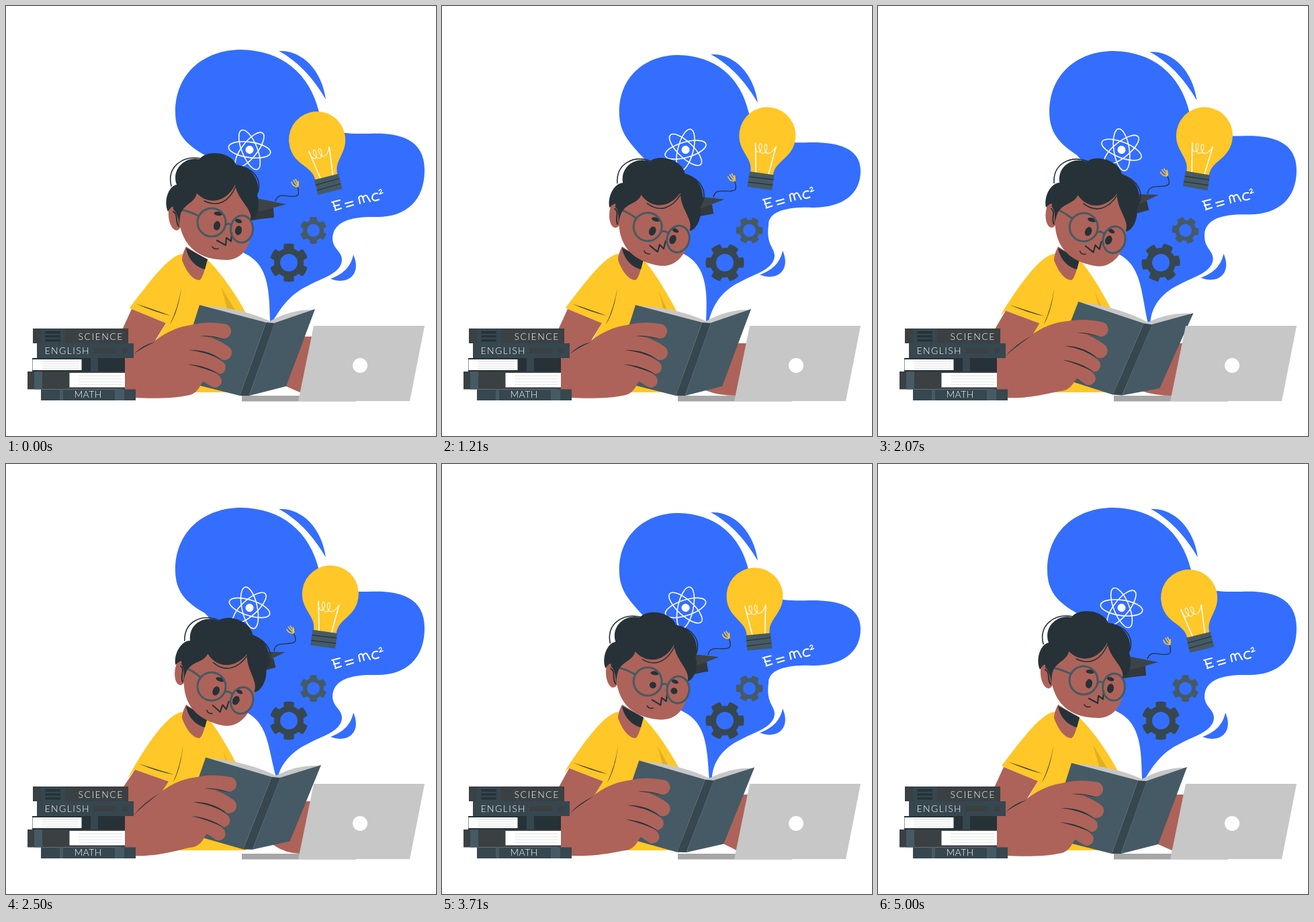
Recreate the animation shown at these times as an HTML page with a canvas. Size 640 by 640 pixels, loop 5.07 s.

```html
<!DOCTYPE html>
<html lang="en">
<head>
<meta charset="utf-8">
<title>Reading</title>
<style>
html, body { margin: 0; width: 100%; height: 100%; overflow: hidden; background: #fff; }
canvas { display: block; width: 100vw; height: 100vh; }
</style>
</head>
<body>
<canvas id="stage" width="640" height="640"></canvas>
<script>
const ctx = document.getElementById('stage').getContext('2d');
const BLUE = '#346eff', YELLOW = '#ffc727', SKIN = '#ad6359', DARK = '#263238',
  SLATE = '#455a64', DEEP = '#37474f', COAL = '#3b4043', GREY = '#c7c7c7', WHITE = '#fff';
const LOOP = 5070, CYCLE = 5000, STEPS = 70;
const rad = d => d * Math.PI / 180;
const clamp = v => Math.max(0, Math.min(1, v));

// Eased rise from 0 to 1 between two times, and a rise followed by a fall.
function ramp(t, from, to) {
  const u = clamp((t - from) / (to - from));
  return u * u * (3 - 2 * u);
}
const pulse = (t, from, peak, to) => ramp(t, from, peak) - ramp(t, peak, to);
// Goes 0, 1, 0 once per period.
const swing = (t, period) => (1 - Math.cos(2 * Math.PI * t / period)) / 2;

function svg(color, d, rule = 'nonzero') {
  ctx.fillStyle = color;
  ctx.fill(new Path2D(d), rule);
}
function line(color, width, d) {
  ctx.strokeStyle = color; ctx.lineWidth = width;
  ctx.stroke(new Path2D(d));
}
function rect(color, x, y, w, h) {
  ctx.fillStyle = color;
  ctx.fillRect(x, y, w, h);
}
function oval(x, y, rx, ry, tilt) {
  ctx.beginPath();
  ctx.ellipse(x, y, rx, ry, rad(tilt), 0, 7);
}
function disc(color, x, y, rx, ry = rx, tilt = 0) {
  oval(x, y, rx, ry, tilt);
  ctx.fillStyle = color; ctx.fill();
}
function ring(color, width, x, y, rx, ry = rx, tilt = 0) {
  oval(x, y, rx, ry, tilt);
  ctx.strokeStyle = color; ctx.lineWidth = width; ctx.stroke();
}
// A line that tapers at both ends.
const crease = (a, [x, y], b, w) =>
  svg(DARK, `M${a}Q${x} ${y - w} ${b}Q${x} ${y + w} ${a}`);
function at(x, y, angle, draw) {
  ctx.save();
  ctx.translate(x, y); ctx.rotate(rad(angle));
  draw();
  ctx.restore();
}
const about = (px, py, dx, dy, angle, draw) =>
  at(px + dx, py + dy, angle, () => { ctx.translate(-px, -py); draw(); });

function poseAt(t) {
  const push = pulse(t, 50, 640, 1200), lift = pulse(t, 2150, 3000, 3900);
  const twist = pulse(t, 1300, 2070, 2900) + .4 * pulse(t, 3000, 3710, 4500);
  const lean = .69 * ramp(t, 0, 1200) + .31 * ramp(t, 1800, 2900) - ramp(t, 3000, 4000);
  const dx = 12 * (push + lift) + 2 * twist, dy = -4 * push - 16 * lift, tilt = 3.7 * twist;
  const c = Math.cos(rad(tilt)), s = Math.sin(rad(tilt));
  return {
    lean,
    raise: clamp(push + lift + .3 * twist),
    armDown: ramp(t, 200, 600) - ramp(t, 3100, 3700),
    sway: swing(t, 2500),
    withBook: draw => about(370, 570, dx, dy, tilt, draw),
    // Where a point that moves with the book ends up.
    held: (x, y) => [370 + dx + (x - 370) * c - (y - 570) * s, 570 + dy + (x - 370) * s + (y - 570) * c]
  };
}

const CLOUD = 'C392 430 391 400 372 380C355 362 340 372 330 330C325 290 320 245 296 222' +
  'C268 206 252 190 252 158C252 100 295 65 350 65C410 66 452 100 466 158' +
  'C478 192 505 190 540 190C580 188 623 195 623 244C623 290 595 315 550 314' +
  'C520 313 486 318 486 347C487 362 500 365 500 378C499 398 470 405 450 416C420 430 408 452 ';

function cloud({ sway, held }) {
  // Each lobe shrinks toward its own middle.
  const squeeze = (x, y) => {
    if (y > 360) return x > 400 ? [x - 5 * sway, y - 6 * sway] : [x + 3 * sway, y];
    if (x >= 478) return [x, y + (250 - y) * .22 * sway];
    return y < 215 ? [x + (370 - x) * .1 * sway, y + (160 - y) * .085 * sway] : [x, y];
  };
  const [x, y] = held(393, 469);
  const outline = CLOUD.replace(/(\d+) (\d+)/g, (_, px, py) => squeeze(+px, +py).join(' '));
  svg(BLUE, `M${x} ${y}${outline}${x + 4} ${y}Z`);
  at(-6 * sway, 5 * sway, 0, () => svg(BLUE, 'M406 67C440 65 470 95 476 139C460 112 438 84 406 67Z'));
  at(-10 * sway, -6 * sway, 0, () => svg(BLUE, 'M517 370C530 400 508 416 483 406C505 398 514 385 517 370Z'));
}

function gear(color, x, y, r, hole, angle) {
  at(x, y, angle, () => {
    ctx.beginPath();
    for (let i = 0; i < 6; i++) {
      const a = rad(i * 60 - 90);
      ctx.arc(0, 0, r, a - .27, a + .27);
      ctx.arc(0, 0, r * .77, a + .35, a + rad(60) - .35);
    }
    ctx.closePath();
    ctx.moveTo(hole, 0);
    ctx.arc(0, 0, hole, 0, 7);
    ctx.fillStyle = color;
    ctx.fill('evenodd');
  });
}

function atom(t) {
  at(362.5, 214, 8 - 50 * swing(t, CYCLE), () => {
    for (let i = 0; i < 3; i++) ring(WHITE, 1.6, 0, 0, 31.5, 11.5, 60 * i);
    disc(WHITE, 0, 0, 6);
  });
}

function formula(sway) {
  at(-7.5 * sway, -3.5 * sway, 0, () => {
    line(WHITE, 2.1, 'M487 292L491 304M485 292L497 289M488 298L496 296M490 304L499 301' +
      'M505 294L516 291M507 299L517 296' +
      'M527 294L525 285Q529 280 531 285L533 292M531 285Q536 279 538 284L542 291' +
      'M553 279Q545 278 545 286Q547 292 555 288');
    line(WHITE, 1.4, 'M555 275Q558 271 559 275L556 280L561 278');
  });
}

function cap(t) {
  const up = swing(t, CYCLE);
  about(400, 295, 4 * Math.sin(2 * Math.PI * t / CYCLE) - up, -12 * up, -10 * up, () => {
    svg('#31393d', 'M350 300L398 301L399 315Q382 316 355 321Z');
    svg('#3d4448', 'M340 283L372 286L417 295L386 304L345 310Z');
    line(DARK, 1.3, 'M401 290C406 274 424 288 434 282C437 278 435 273 434 269');
    line(YELLOW, 1.6, 'M434 269Q427 269 425 262M434 268Q430 264 428 259M435 268Q434 263 431 258M435 267L435 261');
  });
}

function rays(t) {
  const beat = t % 2500;
  const outer = 48 + 9 * clamp((beat - 330) / 150), inner = 48 + 9 * clamp((beat - 500) / 170);
  if (outer - inner < .2) return;
  for (let i = -4; i <= 4; i++) at(0, 0, 30 * i, () => line(DARK, 1.5, `M0 ${-inner}V${-outer}`));
}

function bulb(t) {
  const x = 463 + 23 * (ramp(t, 0, 1450) - ramp(t, 2000, 4150));
  const y = 199 - 6.5 * (ramp(t, 0, 1200) - ramp(t, 2000, 5000));
  const tilt = -14 + 24 * (ramp(t, 0, 1450) - ramp(t, 2000, 4900));
  at(x, y, tilt, () => {
    rays(t);
    svg(YELLOW, 'M-17 58C-16 35 -42 30 -42 0A42 42 0 0 1 42 0C42 30 16 35 17 58Z');
    line(WHITE, 1.6, 'M-9 57L-16 14M10 57L15 15');
    line(WHITE, 1, 'M-16 14C-14 32 -5 28 -6 18C-7 9 -13 15 -8 24C-3 31 2 27 2 18C1 9 -5 15 0 24C5 30 11 24 15 15');
    rect(SLATE, -18.5, 57, 37, 23);
    line(DARK, 1.2, 'M-18 65L18 64M-18 73L18 72');
  });
}

const hemLeft = r => [187 + 10 * r, 451 + 8 * r];
const hemRight = r => [238 + 8 * r, 472 + r];

function shirt({ raise: r, lean }) {
  const edge = 357 - 9 * lean;
  svg(YELLOW, `M262 369C240 372 207 420 ${184 - 6 * r} ${449 + 38 * r}L${hemLeft(r)}L${hemRight(r)}` +
    `L222 500L236 575H357V475L${edge} 457C${edge - 17} 425 ${318 - 3 * lean} 395 300 378Z`);
  svg('#e0b023', `M${320 + 4 * lean} ${418 + 10 * lean}L${edge - 14} 456L330 453Z`);
  svg(SKIN, 'M268 358C264 366 262 372 262 378C268 395 278 408 288 408C293 405 295 394 300 378Z');
  svg(DARK, 'M268 360C270 374 280 388 296 392L300 377Z');
  const dx = 9 * r, dy = 6 * r;
  crease([193 + dx, 443 + dy], [222 + dx, 454 + dy], [245 + dx, 461 + dy * .4], 1.5);
  crease([244 + dx, 474], [256 + dx * .8, 452], [261 + dx * .5, 420], 2.5);
}

function eye(x, y, open) {
  if (open > .25) disc(DARK, x, y, 5, 7 * open, 12);
  else line(DARK, 3.6, `M${x - 4} ${y + 1}Q${x} ${y + 4} ${x + 4} ${y + 2}`);
}

function face(open, spread) {
  disc(DARK, 316, 309, 6.5, 3, 4);
  disc(DARK, 346 + spread / 2, 320, 5.5, 2.8, 18);
  eye(314, 327, open);
  eye(346, 334, open);
  line(DARK, 2.2, 'M314 349L327 356L328 345L335 350L336 338');
  line(DARK, 1.6, 'M307 358Q310 363 316 361');
  ring(SLATE, 3, 306, 322, 21);
  ring(SLATE, 3, 351 + spread, 332, 16.5, 20, 4);
  line(SLATE, 3, `M327 326Q331 322 ${335 + spread} 326M286 312Q272 305 258 303`);
}

function head(t, { lean }) {
  const open = clamp(Math.min(Math.abs(t - 640), Math.abs(t - 3810)) / 140);
  const turned = (dx, dy, draw) => about(280, 375, dx * lean, dy * lean, 14.5 * lean, draw);
  turned(-6, 0, () => {
    svg(SKIN, 'M256 300C256 345 275 378 328 378C352 378 366 355 366 330C366 300 355 270 350 262L270 262Z');
    disc(SKIN, 252, 313, 10, 21, -6);
  });
  turned(-12.5, 2, () => face(open, 4 * lean));
  turned(-6, 0, () => {
    svg(DARK, 'M241 306C234 290 242 268 254 266C245 240 270 223 288 228C298 214 335 216 343 237' +
      'C366 238 380 262 374 282C380 300 372 318 364 319C368 302 345 290 341 266' +
      'C330 289 305 299 284 279C281 292 268 294 262 305C259 308 258 320 258 330' +
      'C257 315 254 306 249 303C250 296 246 298 241 306Z');
    line(DARK, 1.6, 'M246 268C239 240 262 222 290 227M343 237C369 241 381 258 375 277M295 290C315 300 332 292 342 268');
    line(DARK, 2, 'M249 306C257 310 251 320 257 328');
  });
}

function turningPage(t) {
  const turn = (t - 400) / 480;
  if (turn <= 0 || turn >= 1) return;
  const x = 387 + 60 * Math.cos(Math.PI * turn), y = 471 + Math.abs(x - 387) * .3;
  svg('#e0e0e0', `M${x - 31} 461L${x - 24} ${y - 31}Q${x} ${y - 29} ${x + 24} ${y - 20}Q${x + 25} 463 397 471Z`);
}

function openBook(t) {
  svg(GREY, 'M293 446Q352 450 393 469Q424 452 456 452L400 475H387Z');
  turningPage(t);
  svg(SLATE, 'M288 445L387 471L348 580L253 556ZM399 472L460 451L417 566L362 580Z');
  svg(DEEP, 'M387 471L400 472L362 580H348Z');
  line('#5b6f78', .7, 'M400 472L362 580');
}

function fingers() {
  line(SKIN, 22, 'M280 485Q300 480 324 484M280 500Q305 502 325 516');
  line(SKIN, 20, 'M275 520Q300 526 317 538M275 538Q296 548 311 558');
  crease([288, 491], [306, 491], [326, 496], 1.2);
  crease([272, 512], [300, 513], [322, 527], 2.2);
  crease([270, 533], [298, 537], [319, 549], 2.2);
}

function farArm({ armDown: k, held }) {
  const [x, y] = held(417 - 25 * k, 566 + 6 * k), low = 575 + 5 * k;
  svg(SKIN, `M435 ${492 + 10 * k}H462L438 ${low}Q${x + 20} ${low} ${x} ${y}L415 540Z`);
}

function nearArm({ raise: r, held }) {
  const [wx, wy] = held(222, 498), wrist = [wx + 6 * r, wy - 2 * r];
  svg(SKIN, `M${hemLeft(r)}L171 486C150 530 160 575 190 583C225 585 ${held(255, 583)} ${held(268, 580)}` +
    `C${held(280, 579)} ${held(286, 572)} ${held(291, 562)}L${held(300, 550)}L${held(300, 473)}` +
    `C${held(268, 473)} ${held(246, 480)} ${wrist}L${hemRight(r)}Z`);
  crease([190, 518 + 10 * r], [204, 506], [wx, wy + 2], 1.8);
}

function reader(t, pose) {
  farArm(pose);
  pose.withBook(() => openBook(t));
  nearArm(pose);
  pose.withBook(fingers);
}

function title(text, x, y, gap) {
  ctx.font = '300 14px Lato, sans-serif';
  ctx.letterSpacing = gap + 'px';
  ctx.fillStyle = WHITE;
  ctx.fillText(text, x, y);
}
function pages(x, y, w, h) {
  rect(WHITE, x, y, w, h);
  for (let i = 1; i < 5; i++) rect('#d5d7d8', x + 14, y + h * i / 5, w - 18, .7);
}
function shelf() {
  rect(COAL, 40, 480, 142, 22);
  rect(DEEP, 52, 480, 36, 22);
  for (let i = 0; i < 3; i++) rect(DARK, 58.5, 484 + 6 * i, 22.5, 3.5);
  title('SCIENCE', 107.5, 496.5, 1.5);

  rect(DEEP, 46, 502, 144, 22);
  rect(COAL, 130, 509, 34, 8);
  rect(COAL, 173, 509, 8, 8);
  title('ENGLISH', 57.5, 517.5, 1.4);

  rect(DARK, 39, 524, 138, 20);
  pages(39.5, 526, 73, 16);
  rect(DEEP, 126, 524, 11, 20);

  rect(COAL, 32, 544, 145, 26.5);
  rect(SLATE, 42, 544, 12, 26.5);
  pages(94.5, 546, 82.5, 21.5);

  rect(DEEP, 52, 570.5, 141, 16.5);
  rect(SLATE, 80, 570.5, 5, 16.5);
  rect(SLATE, 162, 570.5, 14, 16.5);
  title('MATH', 101.5, 583, .4);
}

function laptop() {
  rect('#a6a6a6', 351, 580, 170, 8.5);
  svg(GREY, 'M458 476H623L601 588H435Z');
  disc(WHITE, 527, 535, 11);
}

function draw(t) {
  const pose = poseAt(t), { sway } = pose;
  rect(WHITE, 0, 0, 640, 640);
  ctx.lineCap = ctx.lineJoin = 'round';
  cloud(pose);
  atom(t);
  gear(DEEP, 421, 382, 28.5, 13, 90 * sway);
  gear(SLATE, 457.5, 334, 20, 9.5, -90 * sway);
  formula(sway);
  cap(t);
  bulb(t);
  shirt(pose);
  head(t, pose);
  reader(t, pose);
  shelf();
  laptop();
}

// The picture advances in even steps and rests on its last one.
function frame(now) {
  const step = Math.floor((now % LOOP + 5) * STEPS / CYCLE);
  draw(Math.min(step, STEPS) * CYCLE / STEPS % CYCLE);
  requestAnimationFrame(frame);
}
frame(0);
</script>
</body>
</html>
```
